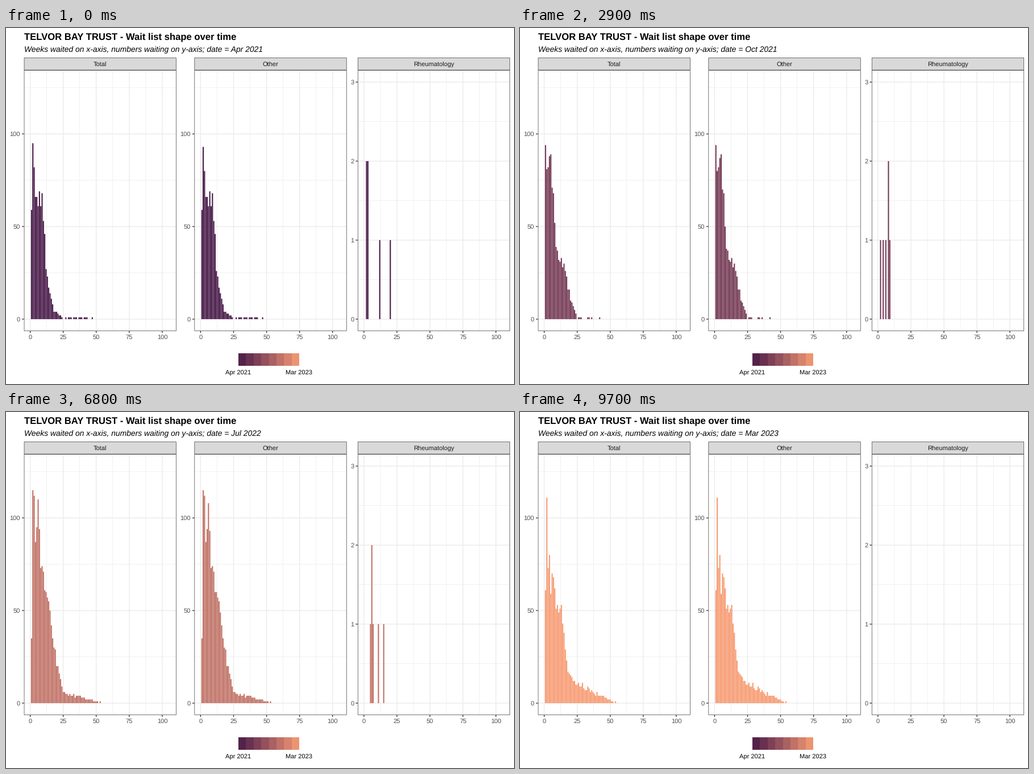
These frames come from a looping animation (894x626 px, 10000 ms). A matplotlib script:

```python
import numpy as np
import matplotlib.pyplot as plt
from matplotlib.animation import FuncAnimation
from matplotlib.collections import PolyCollection
from matplotlib.patches import Rectangle

WIDTH, HEIGHT, DPI = 894, 626, 100
PX = 72 / DPI
MONTHS = 24

plt.rcParams["font.family"] = "Liberation Sans"
plt.rcParams["text.hinting"] = "none"
fig = plt.figure(figsize=(WIDTH / DPI, HEIGHT / DPI), dpi=DPI, facecolor="white")
ax = fig.add_axes([0, 0, 1, 1])
ax.set_xlim(0, WIDTH)
ax.set_ylim(HEIGHT, 0)
ax.axis("off")

# ---- data: smooth curves through a few points, roughened with seeded noise ----
WEEKS = np.arange(56)
CURVE_WEEKS = (1, 2, 4, 6, 9, 13, 18, 25)
CURVES = {
    0: (59, 93, 66, 61, 68, 23, 4, 0.5),
    2: (87, 93, 74, 44, 47, 20, 10, 0.2),
    6: (94, 80, 87, 70, 38, 33, 16, 0.4),
    9: (71, 87, 86, 32, 68, 41, 7, 1),
    13: (46, 113, 105, 77, 60, 41, 30, 0.5),
    18: (27, 117, 75, 128, 84, 68, 30, 9),
    23: (61, 111, 80, 70, 51, 53, 17, 10),
}
# Newest, typical and longest wait in the small specialty
QUEUES = {0: (2, 3, 20), 2: (2, 6, 15), 6: (2, 8, 9),
          9: (2, 7, 15), 13: (10, 10, 11), 18: (2, 5, 18)}


def between_months(table, month):
    months = list(table)
    return [np.interp(month, months, column) for column in zip(*table.values())]


def other_counts(month):
    rng = np.random.default_rng(month)
    knots, heights = list(CURVE_WEEKS), between_months(CURVES, month)
    curve = np.interp(WEEKS, [0, *knots, WEEKS[-1]], [0, *heights, 0])
    noise = rng.normal(1, 0.1, WEEKS.size)
    noise[knots] = 1
    # Random rounding leaves a few lone bars in the thin tail
    rounding = np.where(curve < 3, rng.random(WEEKS.size), 0.5)
    return np.clip(np.floor(curve * noise + rounding), 0, 128)


def rheumatology_counts(month):
    if month > max(QUEUES):
        return np.zeros(WEEKS.size)
    waits = np.interp(np.linspace(0, 1, 6), (0, 0.6, 1), between_months(QUEUES, month))
    counts = np.bincount(np.round(waits).astype(int), minlength=WEEKS.size)
    return np.minimum(counts, 3)


def month_counts(month):
    other, rheumatology = other_counts(month), rheumatology_counts(month)
    return np.minimum(other + rheumatology, 128), other, rheumatology


COUNTS = [month_counts(m) for m in range(MONTHS)]


def month_name(month):
    names = "Jan Feb Mar Apr May Jun Jul Aug Sep Oct Nov Dec".split()
    year, index = divmod(month + 3, 12)
    return f"{names[index]} {2021 + year}"


def month_color(month):
    stops = np.array([(72, 26, 72), (139, 74, 91), (247, 156, 115)]) / 255
    return tuple(np.interp(month, (0, 9, 23), channel) for channel in stops.T)


# ---- layout ----
BASE_FONT = 13.89
SMALL_FONT = 0.8 * BASE_FONT
LINE = 1.35
TICK = 3.47

STRIP_TOP, TOP, BOTTOM = 52.2, 74.3, 532.8
BASE = BOTTOM - (BOTTOM - TOP) / 22
FULL = (BOTTOM - TOP) / 1.1
PANEL_WIDTH = 268.1
WEEK = PANEL_WIDTH / 1.1 / 104.9
WEEK_ZERO = PANEL_WIDTH / 22 - 0.55 * WEEK

# title, left edge, highest count, major step
PANELS = [("Total", 31.7, 128, 50), ("Other", 331.5, 128, 50),
          ("Rheumatology", 618.96, 3, 1)]


def text(x, baseline, label, size=SMALL_FONT, color="black", **style):
    return ax.text(x, baseline, label, fontsize=size * PX, color=color,
                   va="baseline", **style)


def line(xs, ys, color, width=LINE, z=1):
    ax.plot(xs, ys, color=color, lw=width * PX, zorder=z,
            solid_capstyle="butt", snap=False)


def framed_box(left, top, bottom, fill):
    # Only the inner half of the outline is visible
    half = LINE / 2
    ax.add_patch(Rectangle((left + half / 2, top + half / 2), PANEL_WIDTH - half,
                           bottom - top - half, facecolor=fill, edgecolor="#333333",
                           lw=half * PX, zorder=5, snap=False))


def grid_line(xs, ys, major):
    line(xs, ys, "#ebebeb", LINE if major else LINE / 2, z=2 if major else 1)


def week_x(left, week):
    return left + WEEK_ZERO + week * WEEK


def draw_panel(title, left, top_count, step):
    right = left + PANEL_WIDTH
    for week in np.arange(0, 101, 12.5):
        major = week % 25 == 0
        x = week_x(left, week)
        grid_line((x, x), (TOP, BOTTOM), major)
        if major:
            line((x, x), (BOTTOM, BOTTOM + TICK), "#333333")
            text(x, 547.3, f"{week:.0f}", color="#4d4d4d", ha="center")
    for count in np.arange(0, top_count + step / 50, step / 2):
        major = count % step == 0
        y = BASE - FULL * count / top_count
        grid_line((left, right), (y, y), major)
        if major:
            line((left - TICK, left), (y, y), "#333333")
            text(left - 6.5, y + 4, f"{count:.0f}", color="#4d4d4d", ha="right")
    framed_box(left, TOP, BOTTOM, "none")
    framed_box(left, STRIP_TOP, TOP, "#d9d9d9")
    text(left + PANEL_WIDTH / 2, 67.4, title, color="#1a1a1a", ha="center", zorder=6)


for panel in PANELS:
    draw_panel(*panel)

text(31.7, 20, "TELVOR BAY TRUST - Wait list shape over time", 1.2 * BASE_FONT,
     weight="bold")
subtitle = text(31.7, 42, "", BASE_FONT, style="italic")

LEGEND_LEFT, LEGEND_RIGHT, SWATCHES = 409, 516, 8
swatch = (LEGEND_RIGHT - LEGEND_LEFT) / SWATCHES
for i in range(SWATCHES):
    ax.add_patch(Rectangle((LEGEND_LEFT + i * swatch, 572), swatch, 22, lw=0,
                           facecolor=month_color((i + 0.5) / SWATCHES * (MONTHS - 1))))
text(LEGEND_LEFT, 609, month_name(0), ha="center")
text(LEGEND_RIGHT, 609, month_name(MONTHS - 1), ha="center")

bars = PolyCollection([], linewidths=0, zorder=3)
bars.set_snap(False)
ax.add_collection(bars, autolim=False)

# ---- animation ----
FRAMES, INTERVAL = 100, 100
# The first months hold for five ticks, later ones for four
SWITCHES = np.array([4 * m + min(m, 4) for m in range(1, MONTHS)])


def bar_shapes(month):
    shapes = []
    for (_, left, top_count, _), counts in zip(PANELS, COUNTS[month]):
        for week in np.flatnonzero(counts):
            x0, x1 = week_x(left, week - 0.45), week_x(left, week + 0.45)
            y = BASE - FULL * counts[week] / top_count
            shapes.append([(x0, BASE), (x0, y), (x1, y), (x1, BASE)])
    return shapes


def update(frame):
    # Bars switch one tick ahead of the date
    bar_month = int(np.sum(SWITCHES <= frame))
    label_month = int(np.sum(SWITCHES < frame))
    bars.set_verts(bar_shapes(bar_month))
    bars.set_facecolor(month_color(bar_month))
    subtitle.set_text("Weeks waited on x-axis, numbers waiting on y-axis; "
                      f"date = {month_name(label_month)}")
    return bars, subtitle


anim = FuncAnimation(fig, update, frames=FRAMES, interval=INTERVAL,
                     init_func=lambda: update(0), repeat=True, repeat_delay=0)
plt.show()
```
